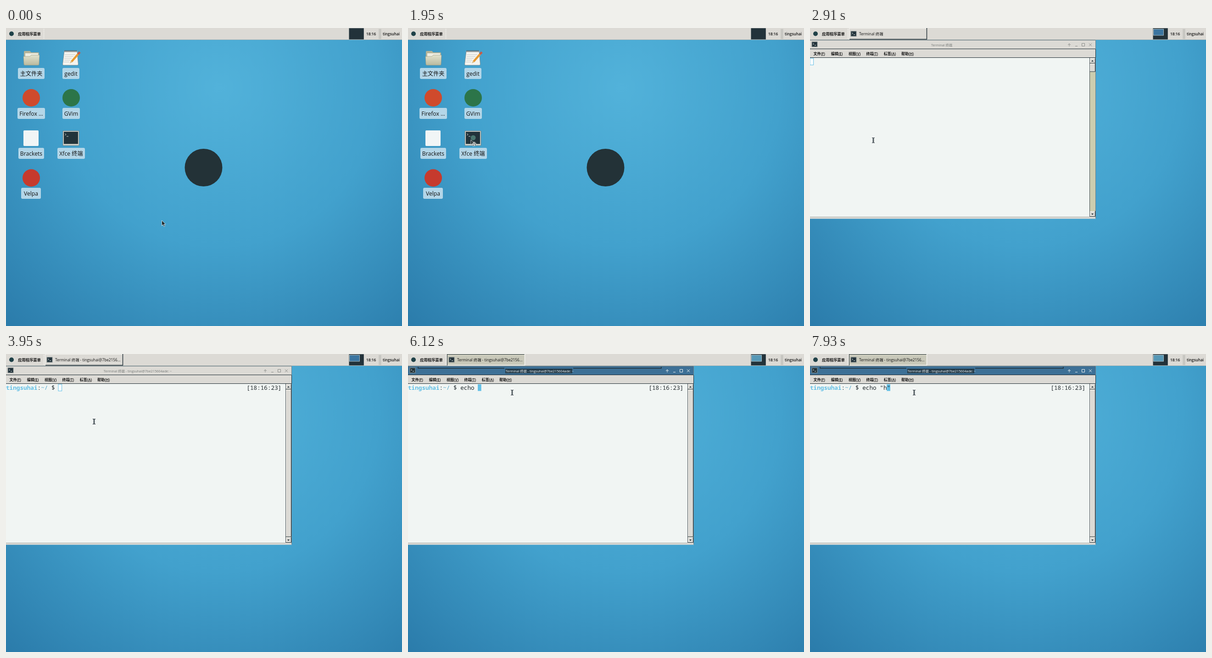
Recreate the animation shown at these times as an HTML page. Size 863x649 px, loop 8000 ms.

```html
<!DOCTYPE html>
<html>
<head>
<meta charset="utf-8">
<style>
html, body { margin: 0; width: 100%; height: 100%; overflow: hidden; }
svg { display: block; width: 863px; height: 649px; }
text { font: 8.3px "Open Sans", "Noto Sans CJK SC", "Noto Sans CJK", sans-serif; font-weight: 600; fill: #111; white-space: pre; }
.label text { font-size: 12.2px; font-weight: 500; text-anchor: middle; }
.label rect { fill: #b3d6e8; }
#menu text { font-size: 8px; }
#menu tspan { text-decoration: underline; }
text.title { font-size: 7.3px; font-weight: 500; text-anchor: middle; }
#task-text { font-weight: 500; }
text.term { font: 12.7px "Noto Sans Mono", "DejaVu Sans Mono", monospace; fill: #20282c; }
.user { font-weight: 600; fill: #62bfe5; }
.line { fill: none; stroke: #1d2b33; }
.shine { fill: none; stroke: #f7f6f2; }
</style>
</head>
<body>
<svg viewBox="0 0 863 649">
  <defs>
    <radialGradient id="sky" gradientUnits="userSpaceOnUse" cx="465" cy="130" r="690">
      <stop offset="0" stop-color="#52b2da"/>
      <stop offset=".5" stop-color="#42a1cd"/>
      <stop offset="1" stop-color="#2b7cab"/>
    </radialGradient>
    <linearGradient id="paper" x2="0" y2="1">
      <stop offset="0" stop-color="#e2e2cd"/>
      <stop offset="1" stop-color="#b9ba9f"/>
    </linearGradient>
    <g id="prompt-icon">
      <rect width="12" height="11" fill="#22323a" stroke="#8d9695"/>
      <path d="M2.5 3l2 1.7-2 1.7M6 7.5h3" fill="none" stroke="#dde4e2"/>
    </g>
  </defs>

  <rect width="863" height="649" fill="url(#sky)"/>
  <circle cx="430.5" cy="304" r="41" fill="#233237"/>

  <g id="icons">
    <path d="M39 52q0-2 2-2h11l3 3h15q2 0 2 2v24H39z" fill="#b3b399"/>
    <path d="M42 55h28v10H42z" fill="#eeeee2"/>
    <path d="M38 62h14l3-3h18l-1 20q0 2-2 2H41q-2 0-2-2z" fill="url(#paper)" stroke="#96977f" stroke-width=".7"/>
    <path d="M127 50h28l2.500 29q0 2-2 2h-30q-2 0-2-2z" fill="#f4f4ef" stroke="#7d8584" stroke-width=".8"/>
    <path d="M128 50.500h27" stroke="#47535a" stroke-width="4" stroke-dasharray="1.500 1.500"/>
    <path d="M128 58h23M128 62h19M127 66h16M127 70h13M126 74h12" stroke="#c3c8c7"/>
    <path d="M143 73l14-16" stroke="#e79a31" stroke-width="4.500"/>
    <path d="M157 57l4-4.500" stroke="#c75a48" stroke-width="4.500"/>
    <path d="M139 77l2.200-5.500 3.500 3z" fill="#d9bd88"/>
    <circle cx="55" cy="152" r="19" fill="#cf4a2c"/>
    <circle cx="142" cy="152" r="19" fill="#2c7549"/>
    <rect x="38" y="223" width="33" height="34" rx="2" fill="#f1f5f6"/>
    <circle cx="55" cy="326.500" r="19" fill="#c63a2d"/>
    <rect x="124" y="224" width="35" height="32" rx="1" fill="#d4d7d0" stroke="#66706f" stroke-width=".8"/>
    <rect x="126" y="226" width="31" height="26.500" fill="#22333a"/>
    <path d="M128.500 230l2.500 2-2.500 2M132 236h4" fill="none" stroke="#d7e0de" stroke-width=".9"/>
    <circle id="badge" cx="142" cy="239" r="5.500" fill="#4a766f"/>
  </g>

  <g id="window">
    <rect y="26" width="623" height="389.500" fill="#dcdad5"/>
    <path d="M0 26.500h622.500V415" fill="none" stroke="#6d7d84"/>
    <g id="focus-bar">
      <rect y="27" width="622" height="18" fill="#3d7096"/>
      <path d="M22 28v3h188M360 31h192v-3" fill="none" stroke="#1f2e37" stroke-width="1.500"/>
      <rect x="212" y="32" width="146" height="10" fill="#243b4a"/>
    </g>
    <use href="#prompt-icon" x="4" y="30"/>
    <text id="title" class="title" x="287" y="39.500"></text>
    <path id="buttons" fill="none" d="M565 40v-6m-3 3l3-3 3 3M578 39.500h5M592.500 33.500h6v6h-6zM608 33.500l6 6m0-6l-6 6"/>
    <path class="line" d="M0 45.500h622M0 64.500h622.500V46"/>
    <g id="menu"></g>
    <rect y="65" width="609" height="346" fill="#f1f5f3"/>
    <path d="M0 411.500h609" stroke="#aaaeaa"/>
    <rect x="610" y="66" width="12" height="345" fill="#cccdaf"/>
    <path class="line" d="M609.500 65v346" stroke-width=".8"/>
    <g id="scroll"></g>
    <rect id="caret" y="66" width="7.600" height="14.500"/>
    <g id="shell">
      <text class="term" y="78"><tspan class="user">tingsuhai</tspan>:<tspan fill="#4fa5cb">~/</tspan> $ <tspan id="typed"></tspan></text>
      <text class="term" x="524.300" y="78">[18:16:23]</text>
    </g>
  </g>

  <rect width="863" height="25.500" fill="#dcdad5"/>
  <path d="M0 25.500h863" stroke="#a9b3b3"/>
  <circle cx="12" cy="12.500" r="5" fill="#1f4148"/>
  <text x="26" y="16">应用程序菜单</text>
  <path d="M82.500 2v21" stroke="#f8f7f4" stroke-dasharray="1 1.500" stroke-width="2"/>
  <g id="task">
    <rect id="task-face" x="85" y="0" width="170" height="25"/>
    <path id="task-top" d="M85.500 25V.5h169" fill="none"/>
    <path id="task-bottom" d="M86 24.500h168.500V0" fill="none" stroke-width="1.500"/>
    <use href="#prompt-icon" x="89" y="7"/>
    <text id="task-text" x="107" y="16"></text>
  </g>
  <rect x="747.500" y=".5" width="32.300" height="24.300" fill="#22323a"/>
  <rect id="pager" x="748.500" y="2.500" width="22" height="13.500" stroke="#c7d6da" stroke-width=".8"/>
  <text x="785" y="16">18:16</text>
  <path d="M813.500 2v22M816.500 2v22" stroke="#a3a5a1"/>
  <text x="821" y="16">tingsuhai</text>

  <g id="arrow">
    <path d="M0 0v11.500l2.700-2.500 2 4.500 2-.9-2-4.300H8.300z" fill="#1c2529" stroke="#eef4f5" stroke-width=".8"/>
    <g id="busy" fill="none">
      <circle cx="7" cy="9" r="3.300" stroke="#f2f5f5" stroke-width="2.500"/>
      <circle cx="7" cy="9" r="3.300" stroke="#1c2529" stroke-width="1.200" stroke-dasharray="3.500 1.700"/>
    </g>
  </g>
  <g id="beam" fill="none">
    <path d="M-3-6h6M-3 6h6M0-6V6" stroke="#fff" stroke-width="3.500"/>
    <path d="M-3-5.500h2.200V5.500H-3M3-5.500H.8V5.500H3" stroke="#18262c" stroke-width="1.100"/>
  </g>
</svg>
<script>
const LOOP = 8000, CELL = 7.62;
const HOVER = 1130, LAUNCH = 1950, OPEN = 2910, READY = 3520, FOCUS = 4680;
const $ = id => document.getElementById(id);
const show = (id, on) => $(id).style.display = on ? '' : 'none';
const set = (id, attrs) => { for (const key in attrs) $(id).setAttribute(key, attrs[key]); };

// [time, command line, caret column]
const typing = [
  [0, '', 0], [5110, 'e', 1], [5260, 'ec', 2], [5400, 'ech', 3], [5470, 'echo', 4],
  [6120, 'echo ', 5], [6650, 'echo "', 6], [6800, 'echo ""', 7], [7170, 'echo ""', 6], [7930, 'echo "h"', 7]
];

const labels = [
  [55, 87, 58, '主文件夹'], [141.5, 87, 37, 'gedit'],
  [55, 174, 60, 'Firefox ...'], [142, 174, 38, 'GVim'],
  [55, 261, 56, 'Brackets'], [142, 261, 60, 'Xfce 终端'],
  [54.5, 348, 43, 'Velpa']
];
$('icons').innerHTML += labels.map(([x, y, w, name]) => `<g class="label">
  <rect x="${x - w / 2}" y="${y}" width="${w}" height="24" rx="3"/>
  <text x="${x}" y="${y + 17}">${name}</text></g>`).join('');

$('menu').innerHTML = ['文件F', '编辑E', '视图V', '终端T', '标签A', '帮助H'].map((item, i) =>
  `<text x="${7.5 + i * 38.3}" y="58.500">${item.slice(0, 2)}(<tspan>${item[2]}</tspan>)</text>`).join('');

const bevel = (id, y, h) => `<g id="${id}"><rect x="610" y="${y}" width="12" height="${h}" fill="#dcdad5"/>
  <path class="shine" d="M610.500 ${y + h}v${-h + .5}h11"/>
  <path class="line" d="M610 ${y + h - .5}h11.500v${-h}"/></g>`;
$('scroll').innerHTML = bevel('up', 66, 11) + bevel('down', 399, 12) + bevel('short-thumb', 77.5, 18) +
  bevel('long-thumb', 77.5, 321) + '<path d="M613 73l2.500-3 2.500 3zM613 404l2.500 3 2.500-3z" fill="#1d2b33"/>';

// Pointer position, moved in equal time steps along an eased line
function glide(t, start, end, steps, [x0, y0], [x1, y1]) {
  const n = t < start ? 0 : Math.floor((t - start) / (end - start) * (steps - 1) + 1.001);
  const p = Math.min(1, n / steps), e = p * p * (3 - 2 * p);
  return `translate(${x0 + (x1 - x0) * e} ${y0 + (y1 - y0) * e})`;
}

function draw(t) {
  const open = t >= OPEN, ready = t >= READY, focused = t >= FOCUS;
  const [, text, column] = typing.filter(step => step[0] <= t).pop();

  for (const id of ['window', 'task', 'pager', 'beam']) show(id, open);
  show('arrow', !open);
  show('busy', t >= LAUNCH);
  show('badge', t >= HOVER);
  show('focus-bar', focused);
  show('shell', ready);
  show('long-thumb', ready);
  show('short-thumb', !ready);

  $('title').textContent = 'Terminal 终端' + (ready ? ' - tingsuhai@7be215604ade: ~' : '');
  $('title').style.fill = focused ? '#f4f7f7' : '#777a78';
  $('task-text').textContent = 'Terminal 终端' + (ready ? ' - tingsuhai@7be2156...' : '');
  set('buttons', { stroke: focused ? '#f1f5f5' : '#8a8c89' });
  set('task-face', { fill: focused ? '#c9c9ba' : '#dcdad5' });
  set('task-top', { stroke: focused ? '#26343b' : '#f7f6f2' });
  set('task-bottom', { stroke: focused ? '#f7f6f2' : '#26343b' });
  set('pager', { fill: focused ? '#5698b6' : '#3b75a0' });

  $('typed').textContent = text;
  set('caret', {
    x: ready ? (15 + column) * CELL - .3 : 0,
    fill: focused ? '#62bfe5' : '#fdfefe',
    stroke: focused ? 'none' : '#62bfe5'
  });
  set('arrow', { transform: glide(t, 420, HOVER, 12, [339.5, 419], [137, 243.5]) });
  set('beam', { transform: glide(t, READY, 4310, 14, [138, 244.5], [227, 84]) });
}

function frame() {
  draw(performance.now() % LOOP);
  requestAnimationFrame(frame);
}
frame();
</script>
</body>
</html>
```
